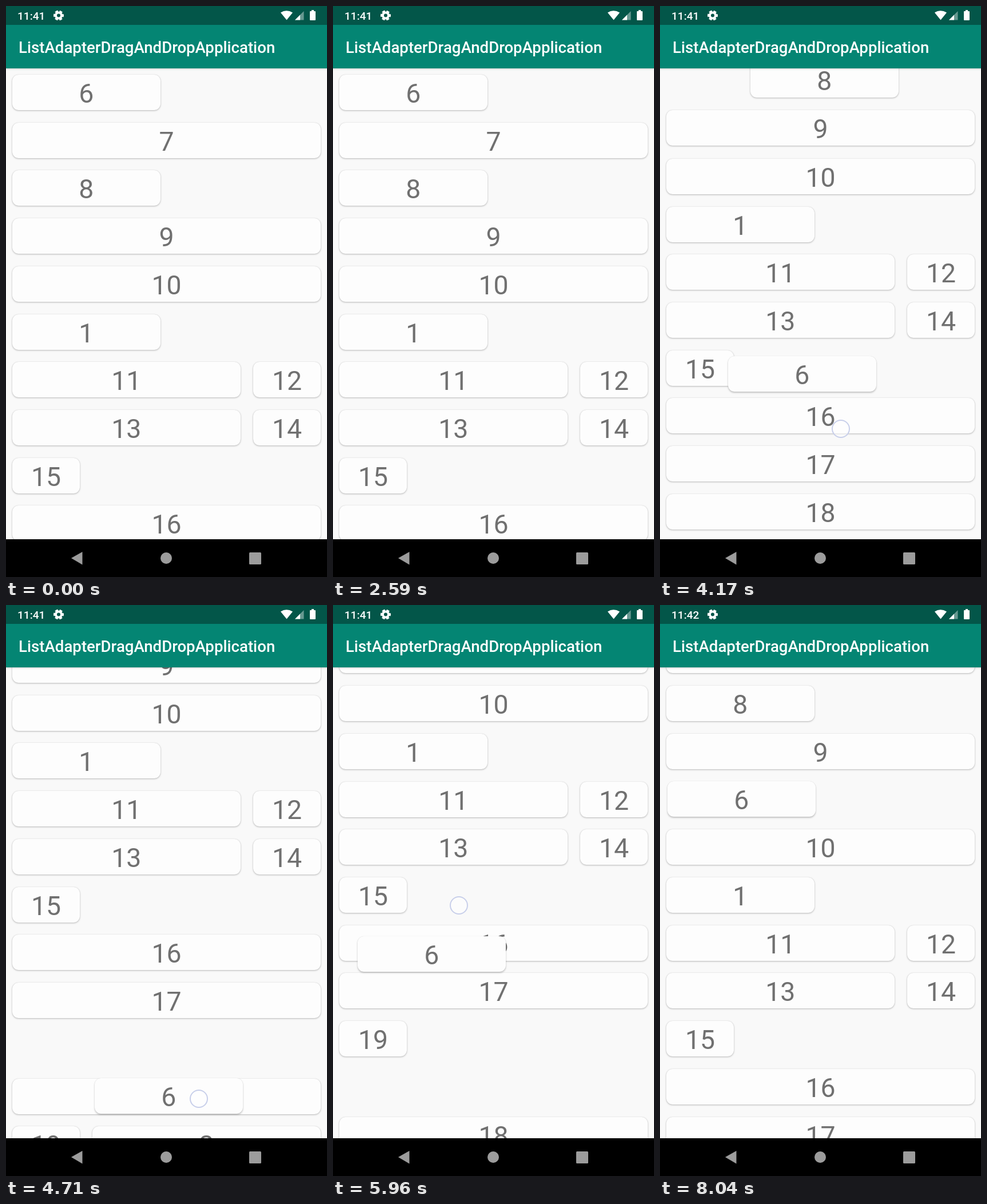
Write an HTML page that moves like this. It is 561x998 px and loops after 8.08 s.

```html
<!DOCTYPE html>
<html lang="en">
<head>
<meta charset="utf-8">
<title>Drag and drop list</title>
<style>
  html, body { margin: 0; width: 100%; height: 100%; overflow: hidden; background: #f9f9f9; }
  #stage { position: relative; width: 561px; height: 998px; overflow: hidden; background: #f9f9f9;
    font-family: Roboto, sans-serif; }
  .card { position: absolute; left: 0; top: 0; height: 62px; border-radius: 11px;
    background: #fdfdfd; color: #707070; font-size: 46.4px; line-height: 67px; text-align: center;
    box-shadow: 0 1px 3px rgba(0, 0, 0, .26), 0 0 1px rgba(0, 0, 0, .16); }
  .card.lifted { z-index: 1; box-shadow: 0 2px 3px rgba(0, 0, 0, .22), 0 0 1px rgba(0, 0, 0, .16); }
  #bar { position: absolute; left: 0; top: 0; width: 561px; height: 109px; z-index: 2;
    background: #048573; box-shadow: 0 1px 3px rgba(0, 0, 0, .2); }
  svg { position: absolute; left: 0; top: 0; z-index: 3; }
  #touch { position: absolute; left: -16px; top: -16px; width: 28px; height: 28px; z-index: 4;
    border: 2px solid #c8cfea; border-radius: 50%; background: rgba(255, 255, 255, .5); }
</style>
</head>
<body>
<div id="stage">
  <div id="bar"></div>
  <svg width="561" height="998" fill="#fff">
    <rect width="561" height="33" fill="#035649"/>
    <text id="clock" x="20" y="24" font-size="19.1" font-weight="500">11:41</text>
    <g fill="none" stroke="#fff">
      <circle cx="92" cy="16.5" r="5" stroke-width="4"/>
      <circle cx="92" cy="16.5" r="7.5" stroke-width="3" stroke-dasharray="5 2.854" stroke-dashoffset="2.5"/>
    </g>
    <path d="M480 11.5Q490 5 501 11.5L490.5 24.5Z"/>
    <path d="M505 24.5L520.5 9V24.5Z" opacity=".4"/>
    <path d="M505 24.5L514 15.5V24.5Z"/>
    <path d="M534 7h4v2h2q1 0 1 1v14q0 1-1 1h-8q-1 0-1-1v-14q0-1 1-1h2Z"/>
    <text x="22" y="81.5" font-size="27.6" font-weight="500">ListAdapterDragAndDropApplication</text>
    <rect y="932" width="561" height="66" fill="#000"/>
    <g fill="#9c9c9c">
      <path d="M114 965L133.5 954V976.5Z"/>
      <circle cx="280" cy="965" r="10"/>
      <rect x="425" y="955" width="21" height="21" rx="1.5"/>
    </g>
  </svg>
  <div id="touch"></div>
</div>
<script>
const LOOP = 8080, SHIFT = 250, REACT = 150, LEAD = 70;
const ROW = 83.72, COL = 140.25, TOP = 120;
const PRESS = 2900, DROP = 7810, REORDER = 5100, MINUTE = 6400;
const DRAGGED = '6';

const span = { 5: 3, 6: 2, 7: 4, 8: 2, 9: 4, 10: 4, 1: 2, 11: 3, 12: 1, 13: 3, 14: 1,
  15: 1, 16: 4, 17: 4, 18: 4, 19: 1, 2: 3 };
const head = '5 7 8 9 10 1 11 12 13 14 15 16 17 ';
const early = (head + '18 19 2').split(' ');
const late = (head + '19 2 18').split(' ');

// Each drag stroke eases the card and the list scroll to a new resting pose.
const rest = { x: 11, y: TOP, scroll: 0 };
const strokes = [
  { from: 3335, to: 3740, x: 70.5, y: 324.5, scroll: 37.7 },
  { from: 3860, to: 4430, x: 155, y: 827, scroll: -213.4 },
  { from: 4850, to: 5250, x: 59, y: 840, scroll: -230 },
  { from: 5617, to: 6397, x: 20, y: 200, scroll: -230 },
  { from: 6400, to: 6600, x: 168, y: 271.5, scroll: -62.7 }
];

const clamp = u => Math.max(0, Math.min(1, u));
const ease = u => (1 - Math.cos(Math.PI * clamp(u))) / 2;
const mix = (a, b, p) => a + (b - a) * p;
const at = (el, x, y) => {
  el.style.transform = `translate(${Math.round(x)}px, ${Math.round(y)}px)`;
};

function pose(t) {
  return strokes.reduce((p, s) => {
    const k = ease((t - s.from) / (s.to - s.from));
    return { x: mix(p.x, s.x, k), y: mix(p.y, s.y, k), scroll: mix(p.scroll, s.scroll, k) };
  }, rest);
}

// Packs cards into four columns; the first card sits one row above the list top.
function pack(order) {
  const spots = {};
  let row = -1, col = 0;
  for (const id of order) {
    if (col + span[id] > 4) { row++; col = 0; }
    spots[id] = { row, x: 11 + col * COL, y: TOP + row * ROW };
    col += span[id];
  }
  return spots;
}

// Follows the dragged card through the list and notes every change of layout.
function planLayouts() {
  const layouts = [];
  let slot = 1, last = '';
  for (let t = 0; t < DROP; t += 10) {
    const list = t < REORDER ? early : late;
    const home = pack(list);
    const { y, scroll } = pose(t - REACT);
    const row = (y - scroll - TOP) / ROW;
    while (slot < list.length && home[list[slot]].row < row - 1.1) slot++;
    while (slot > 1 && home[list[slot - 1]].row > row) slot--;
    const order = [...list.slice(0, slot), DRAGGED, ...list.slice(slot)];
    if (order.join() !== last) layouts.push({ time: t, spots: pack(order) });
    last = order.join();
  }
  return layouts;
}

const layouts = planLayouts();
const home = layouts[layouts.length - 1].spots[DRAGGED];

function spotOf(id, t) {
  let { x, y } = layouts[0].spots[id];
  for (let i = 1; i < layouts.length; i++) {
    const a = layouts[i - 1].spots[id], b = layouts[i].spots[id];
    const p = ease((t - layouts[i].time) / SHIFT);
    x += (b.x - a.x) * p;
    y += (b.y - a.y) * p;
  }
  return { x, y };
}

const stage = document.getElementById('stage');
const touch = document.getElementById('touch');
const clock = document.getElementById('clock');
const cards = {};
for (const id of [...early, DRAGGED]) {
  const el = document.createElement('div');
  el.className = 'card';
  el.textContent = id;
  el.style.width = span[id] * COL - 22 + 'px';
  stage.append(el);
  cards[id] = el;
}

function draw(t) {
  const card = pose(t);
  for (const id of early) {
    const { x, y } = spotOf(id, t);
    at(cards[id], x, y + card.scroll);
  }
  cards[2].style.opacity = t > REORDER ? clamp((t - 6000) / 120) : 1;

  const back = ease((t - DROP) / SHIFT);
  at(cards[DRAGGED], mix(card.x, home.x, back), mix(card.y, home.y + card.scroll, back));
  cards[DRAGGED].classList.toggle('lifted', t >= strokes[0].from);

  // The finger runs slightly ahead of the card.
  const finger = pose(t + LEAD);
  at(touch, finger.x + 182, finger.y + 36);
  touch.style.opacity = t >= PRESS && t < DROP ? 1 : 0;
  clock.textContent = t < MINUTE ? '11:41' : '11:42';
}

const start = performance.now();
function tick() {
  draw((performance.now() - start) % LOOP);
  requestAnimationFrame(tick);
}
tick();
</script>
</body>
</html>
```
